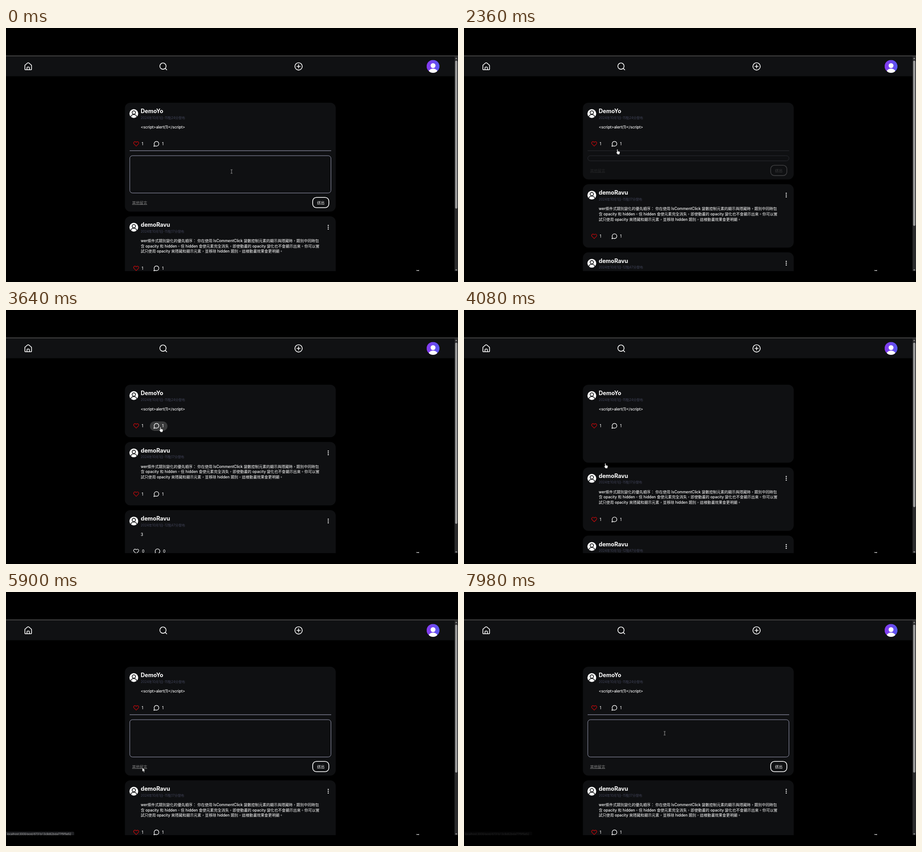
Recreate the animation shown at these times as an HTML page. Size 998x561 px, loop 8 s.

```html
<!DOCTYPE html>
<html lang="zh-Hant">
<head>
<meta charset="utf-8">
<title>Post feed</title>
<style>
  html, body { margin: 0; width: 100%; height: 100%; overflow: hidden; background: #000; }
  svg { display: block; width: 100%; height: 100%; }
  text { font: 500 8.3px Inter, "Noto Sans CJK TC", "Noto Sans CJK", sans-serif; fill: #fff; }
  .name { font-size: 12.5px; font-weight: 700; }
  .date { font-size: 7.2px; font-weight: 400; fill: #414459; }
  .link { font-weight: 400; fill: #858585; text-decoration: underline; }
  .status { font: 400 6.2px "Open Sans", "Noto Sans", sans-serif; fill: #b4b4b4; }
  .line { fill: none; stroke: #fff; stroke-linecap: round; stroke-linejoin: round; }
</style>
</head>
<body>
<svg viewBox="0 0 998 561" preserveAspectRatio="none">
  <defs>
    <linearGradient id="violet"><stop stop-color="#8739ef"/><stop offset="1" stop-color="#5757ef"/></linearGradient>
    <clipPath id="page"><rect y="60" width="998" height="477"/></clipPath>
    <clipPath id="disc"><circle r="14.3"/></clipPath>
    <clipPath id="smallDisc"><circle r="9.7"/></clipPath>
    <g id="person">
      <circle r="9.7" fill="#fff"/>
      <g clip-path="url(#smallDisc)" fill="none" stroke="#0f1012" stroke-width="1.6">
        <circle cy="-2.3" r="3.7"/>
        <path d="M-6.8 8C-6 .2 6 .2 6.8 8"/>
      </g>
    </g>
    <path id="heart" d="M20.8 4.6a5.5 5.5 0 0 0-7.8 0L12 5.7l-1.1-1.1a5.5 5.5 0 0 0-7.8 7.8L12 21.2l8.8-8.8a5.5 5.5 0 0 0 0-7.8z" transform="scale(.54) translate(-12 -12)"/>
    <path id="bubble" d="M21 11.5a8.5 8.5 0 0 1-8.5 8.5 8.4 8.4 0 0 1-3.8-.9L3 21l1.9-5.7a8.4 8.4 0 0 1-.9-3.8 8.5 8.5 0 0 1 17 0z" transform="scale(.61) translate(-12 -12)"/>
  </defs>
  <rect width="998" height="561"/>
  <g clip-path="url(#page)">
    <rect y="60.6" width="998" height="2.2" fill="#454545"/>
    <rect y="62.8" width="990" height="43.8" fill="#101113"/>
    <g class="line" stroke-width="1.6">
      <path d="M41.6 83.4q0-1.2.9-1.9l5.2-4.3q1.3-1 2.6 0l5.2 4.3q.9.7.9 1.9v7q0 1.9-1.9 1.9h-11q-1.9 0-1.9-1.9zM46.4 92v-4.2q0-1.6 1.6-1.6h2q1.6 0 1.6 1.6V92"/>
      <path d="M351.6 89.2l3.2 3.2"/><circle cx="346.6" cy="84.2" r="6.9"/>
      <circle cx="646" cy="84.8" r="8.1"/><path d="M642.3 84.8h7.4M646 81.1v7.4"/>
    </g>
    <g transform="translate(942.9 84.7)" clip-path="url(#disc)">
      <circle r="14.3" fill="url(#violet)"/>
      <circle cy="-1.6" r="5.4" fill="#fff"/><ellipse cy="12" rx="9.6" ry="7" fill="#fff"/>
    </g>
    <g id="cards"></g>
    <rect x="990.3" y="62.8" width="7.7" height="474.2" fill="#2b2b2c"/>
    <rect id="thumb" x="991.7" y="72" width="4.8" rx="2.4" fill="#9d9d9d"/>
    <path d="M994.1 65.6l2.2 3h-4.4zM994.1 536.2l2.2-3h-4.4z" fill="#9d9d9d"/>
    <path d="M907 534.4v2M906.6 535.6h5.4M911.4 534.6v2.2" stroke="#ddd" stroke-width="1.1"/>
    <g id="status">
      <path d="M0 529.6h148q2.5 0 2.5 2.5V537H0z" fill="#202124"/>
      <text class="status" x="2.5" y="536.8">localhost:3000/post/6731b13c8d62bda77f9f9a92</text>
    </g>
    <g id="cursor">
      <path id="hand" d="M-.9 1a1 1 0 0 1 1.9 0v3.6l3.4.7q1.3.3 1.2 1.6l-.5 3-.8 1.8H.6L-2.4 8q-.6-1 .4-1.4l1.1.7z" fill="#fff" stroke="#000" stroke-width=".5"/>
      <path id="arrow" d="M0 0v9l2.1-1.9 1.5 3.3 1.5-.7-1.5-3.2 2.8-.2z" fill="#fff" stroke="#000" stroke-width=".5"/>
      <path id="beam" d="M-2-4h1.4L0-3.5.6-4H2M0-3.5v7M-2 4h1.4L0 3.5.6 4H2" fill="none" stroke="#c4c4c4" stroke-width=".8"/>
    </g>
  </g>
</svg>
<script>
const LOOP = 8000, CARD_TOP = 165, PANEL = 124.5, GAP = 10.5;
const CLOSE_AT = 1830, OPEN_AT = 3617, SLIDE = 1400;
const $ = id => document.getElementById(id);
const escapeText = s => s.replace(/</g, '&lt;').replace(/>/g, '&gt;');

const posts = [
  { name: 'DemoYo', date: '2024年10月1日-15點24分發布', lines: ['<script>alert(1)<\/script>'], likes: 1, comments: 1, height: 116 },
  { name: 'demoRavu', date: '2024年10月1日-15點17分發布', lines: [
    'wer條件式類別變化的優先順序： 你在使用 IsCommentClick 變數控制元素的顯示與隱藏時，類別中同時包',
    '含 opacity 和 hidden。但 hidden 會使元素完全消失，即使動畫的 opacity 變化也不會顯示出來。你可以嘗',
    '試只使用 opacity 來隱藏和顯示元素，並移除 hidden 類別，這樣動畫效果會更明顯。'
  ], likes: 1, comments: 1, height: 140, menu: true },
  { name: 'demoRavu', date: '2024年10月1日-12點47分發布', lines: ['3'], likes: 0, comments: 0, height: 116, menu: true }
];

const panel = `<g id="panel">
  <path d="M273 106h445" stroke="#a9abc4"/>
  <rect id="box" x="273.3" y="117" width="444.2" rx="6" fill="none" stroke="#a9abc4" stroke-width=".9"/>
  <g id="footer">
    <text class="link" x="278.5" y="223.5">其他留言</text>
    <rect x="677.2" y="209.2" width="35.6" height="22.6" rx="8" fill="none" stroke="#fff" stroke-width="1.6"/>
    <text x="695" y="223.5" text-anchor="middle">送出</text>
  </g></g>`;

function cardMarkup(post, i) {
  const row = post.height - 25, shift = post.likes ? 0 : 1.5;
  const body = post.lines.map((line, n) =>
    `<text x="297.5" y="${57 + n * 11.7}">${escapeText(line)}</text>`).join('');
  const dots = [20, 24, 28].map(y => `<circle cx="711.5" cy="${y}" r="1.25" fill="#fff"/>`).join('');
  return `<g id="card${i}">
    <rect id="back${i}" x="262.5" width="465.5" height="${post.height}" rx="12" fill="#0f1012"/>
    <use href="#person" x="282.2" y="24"/>
    <text class="name" x="297.5" y="23.3">${post.name}</text>
    <text class="date" x="297.5" y="35.6">${post.date}</text>
    ${body}${post.menu ? dots : ''}
    ${i ? '' : `<rect id="pill" x="317.6" y="${row - 10}" width="39" height="21" rx="10.5" fill="#393a3b"/>`}
    <g class="line" stroke-width="2.1">
      <use href="#heart" x="287.5" y="${row}" style="stroke:${post.likes ? '#c9090c' : '#fff'}"/>
      <use href="#bubble" x="${332 + 1.5 * shift}" y="${row}"/>
    </g>
    <text x="${299.4 + shift / 2}" y="${row + 3}">${post.likes}</text>
    <text x="${344.5 + 1.5 * shift}" y="${row + 3}">${post.comments}</text>
    ${i ? '' : panel}</g>`;
}
$('cards').innerHTML = posts.map(cardMarkup).join('');

const clamp = v => Math.min(1, Math.max(0, v));
const ramp = (t, start, length) => clamp((t - start) / length);

// cubic-bezier(.4, 0, .2, 1)
function ease(x) {
  let lo = 0, hi = 1;
  for (let i = 0; i < 20; i++) {
    const s = (lo + hi) / 2, r = 1 - s;
    if (1.2 * r * r * s + .6 * r * s * s + s ** 3 < x) lo = s; else hi = s;
  }
  return lo * lo * (3 - 2 * lo);
}

// time, x, y of the pointer's hot spot
const path = [
  [0, 498, 317], [250, 498, 317], [1100, 342, 258], [1950, 342, 258], [2820, 335, 278],
  [3350, 341, 258], [3680, 341, 258], [4080, 312, 338], [4600, 301, 388],
  [7150, 301, 388], [7750, 443, 312], [LOOP, 443, 312]
];
function pointerAt(t) {
  const i = path.findIndex(p => p[0] > t);
  const [t0, x0, y0] = path[i - 1], [t1, x1, y1] = path[i];
  const k = (t - t0) / (t1 - t0);
  return [x0 + (x1 - x0) * k, y0 + (y1 - y0) * k];
}

const move = (id, x, y) => $(id).setAttribute('transform', `translate(${x} ${y})`);
const show = (id, opacity) => $(id).setAttribute('opacity', +opacity);

function draw(t) {
  const opening = t >= OPEN_AT;
  const slide = ease(ramp(t, opening ? OPEN_AT : CLOSE_AT, SLIDE));
  const extra = PANEL * (opening ? slide : 1 - slide);
  const fade = opening ? ramp(t, 4080, 650) : 1 - ramp(t, CLOSE_AT, 650);

  let top = CARD_TOP;
  posts.forEach((post, i) => {
    move('card' + i, 0, top);
    top += post.height + GAP + (i ? 0 : extra);
  });
  $('back0').setAttribute('height', posts[0].height + extra);
  const boxHeight = Math.max(0, 82.4 + extra - PANEL);
  $('box').setAttribute('height', boxHeight);
  move('footer', 0, extra - PANEL);
  show('panel', fade);
  $('thumb').setAttribute('height', 222200 / (555 + extra));

  const [x, y] = pointerAt(t);
  move('cursor', x, y);
  show('pill', x > 318 && x < 357 && y > 246 && y < 267);
  const inBox = fade > .5 && x > 273 && x < 718 && y > 282 && y < 282 + boxHeight;
  const kind = inBox ? 'beam' : t > 5100 ? 'arrow' : 'hand';
  for (const id of ['hand', 'arrow', 'beam']) show(id, id === kind);

  show('status', ramp(t, 5100, 150) * (1 - ramp(t, 7600, 480)));
}

function frame(now) {
  draw(now % LOOP);
  requestAnimationFrame(frame);
}
draw(0);
requestAnimationFrame(frame);
</script>
</body>
</html>
```
